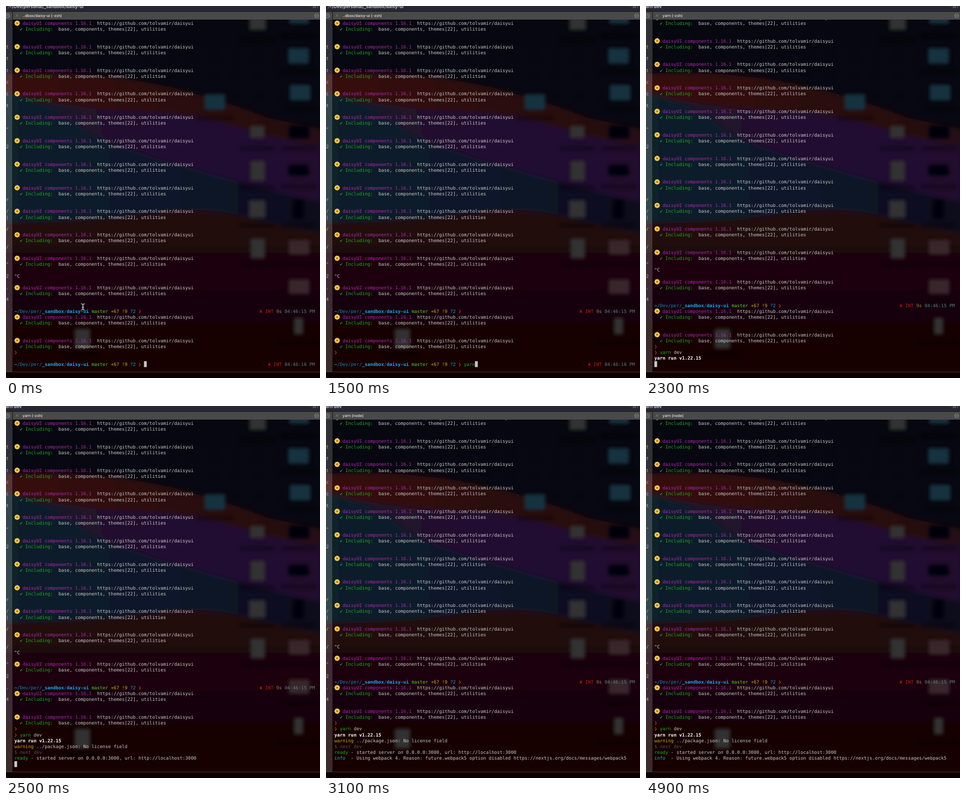
These frames come from a looping animation (600 by 709 pixels, 5000 ms). An HTML page:

```html
<!DOCTYPE html>
<html lang="en">
<head>
<meta charset="utf-8">
<title>Terminal</title>
<style>
html, body { margin: 0; width: 100%; height: 100%; overflow: hidden; background: #120306; }
svg { display: block; width: 600px; height: 709px; }
text { white-space: pre; text-rendering: geometricPrecision; }
.mono { font: 8.75px "DejaVu Sans Mono", "Liberation Mono", monospace; fill: #c7c7c7; }
.ui { font: 500 7.3px Inter, sans-serif; fill: #e6e6e6; }
.title { font: 700 8.4px Inter, sans-serif; fill: #c4c4cc; text-anchor: end; }
.magenta { fill: #b428b2; }
.green { fill: #1cad1c; }
.dir { fill: #1287b4; }
.anchor { fill: #14a9f0; font-weight: bold; }
.branch { fill: #55cf25; }
.yellow { fill: #cfab1c; }
.blue { fill: #1a9fe0; }
.arrow { fill: #d9391c; }
.red { fill: #cc1610; }
.olive { fill: #80805c; }
.time { fill: #577f80; }
.bold { fill: #fff; font-weight: bold; }
.dim { fill: #585054; }
.cyan { fill: #25b0bd; }
</style>
</head>
<body>
<svg viewBox="0 0 600 709">
  <defs>
    <filter id="soft" x="-10%" y="-10%" width="120%" height="120%"><feGaussianBlur stdDeviation="5"/></filter>
    <filter id="haze" x="-10%" y="-10%" width="120%" height="120%"><feGaussianBlur stdDeviation="3"/></filter>
    <linearGradient id="sky" x2="0" y2="1"><stop stop-color="#06070f"/><stop offset="1" stop-color="#0b0a18"/></linearGradient>
    <linearGradient id="crimson"><stop stop-color="#38100f"/><stop offset=".5" stop-color="#2c0b0e"/><stop offset="1" stop-color="#260912"/></linearGradient>
    <linearGradient id="violet"><stop stop-color="#1c1426"/><stop offset=".6" stop-color="#240f33"/><stop offset="1" stop-color="#1f0d2e"/></linearGradient>
    <linearGradient id="teal"><stop stop-color="#0d2129"/><stop offset=".5" stop-color="#10162a"/><stop offset="1" stop-color="#0c0c1c"/></linearGradient>
    <linearGradient id="floor" x2="0" y2="1"><stop stop-color="#25090c"/><stop offset=".35" stop-color="#1b0508"/><stop offset="1" stop-color="#100204"/></linearGradient>
    <clipPath id="pane"><path d="M0 26H600V697H0z"/></clipPath>
    <g id="daisy"></g>
  </defs>

  <rect width="600" height="709" fill="url(#sky)"/>
  <g filter="url(#soft)">
    <path fill="url(#crimson)" d="M-20 130Q130 122 250 142T500 213L620 238V420H-20z"/>
    <path fill="url(#violet)" d="M-20 160Q110 196 250 200T480 245L620 268V420H-20z"/>
    <path fill="url(#teal)" d="M-20 158Q90 186 130 222T330 303T620 378V460H-20z"/>
    <path fill="url(#floor)" d="M-20 412Q150 412 260 396T450 400T620 436V730H-20z"/>
  </g>
  <g id="icons" filter="url(#haze)"></g>

  <path fill="#fff" fill-opacity=".17" d="M0 26H12V698H0z"/>
  <path fill="#000" fill-opacity=".3" d="M0 698H600V709H0z"/>
  <path stroke="#54454a" stroke-opacity=".7" d="M0 697.5H600"/>
  <g id="side"></g>
  <g clip-path="url(#pane)"><g id="screen"></g></g>

  <path fill="#272734" d="M0 0H600V11H0z"/>
  <path fill="#494949" d="M0 11H600V26H0z"/>
  <path stroke="#15151b" d="M0 10.5H600M12.5 11V698"/>
  <text class="title" id="title" y="4"></text>
  <text class="title" x="597" y="4" style="font-weight:400;fill:#85858c">⌃⌘1</text>
  <text class="ui" id="tab" x="31.5" y="21"></text>
  <g fill="none" stroke="#aaa" stroke-width=".8">
    <path stroke="#858585" d="M18.8 15.8l5 5m0-5l-5 5"/>
    <circle cx="3" cy="18.5" r="3.7"/><path d="M1 18.5h4"/>
    <circle cx="593.5" cy="18.5" r="3.7"/><path d="M591.5 18.5h4"/>
  </g>
  <g id="beam" fill="none" stroke-linecap="round">
    <path id="beamShape" stroke="#222" stroke-width="2.6" d="M144 567.5Q147 567.5 147 570V577Q147 579.5 144 579.5M150 567.5Q147 567.5 147 570M147 577Q147 579.5 150 579.5M145.5 574H148.5"/>
    <use href="#beamShape"/>
    <path stroke="#e8e8e8" d="M144 567.5Q147 567.5 147 570V577Q147 579.5 144 579.5M150 567.5Q147 567.5 147 570M147 577Q147 579.5 150 579.5M145.5 574H148.5"/>
  </g>
</svg>
<script>
const LOOP = 5000, LEFT = 16, COL = 5.268, LINE = 11.2, BASE = 36, LAST = 58;
const START = 1200, KEY = 100, ENTER = 2000, READY = 2500, INFO = 2800;
const $ = id => document.getElementById(id);

function add(parent, tag, attrs, text = "") {
  const el = document.createElementNS("http://www.w3.org/2000/svg", tag);
  for (const k in attrs) el.setAttribute(k, attrs[k]);
  el.textContent = text;
  return parent.appendChild(el);
}

// A row is a list of [column, class, text] pieces.
function row(n, ...parts) {
  const text = add($("screen"), "text", { class: "mono", y: BASE + n * LINE });
  for (const [col, cls, str] of parts)
    add(text, "tspan", { x: LEFT + col * COL, class: cls }, str);
  return text;
}

function daisyRows(n) {
  add($("screen"), "use", { href: "#daisy", x: 21.3, y: BASE - 3.2 + n * LINE });
  row(n, [3, "magenta", "daisyUI components 1.16.1"], [30, "", "https://github.com/tolvamir/daisyui"]);
  row(n + 1, [2, "green", "✔"], [4, "green", "Including:"], [16, "", "base, components, themes[22], utilities"]);
}

function prompt(n, time, took) {
  const right = took ? 89 : 92;
  return row(n, [0, "anchor", "~"], [1, "dir", "/Dev/per/"], [10, "anchor", "_sandbox"], [18, "dir", "/"],
    [19, "anchor", "daisy-ui"], [28, "branch", "master"], [35, "yellow", "+67"], [39, "yellow", "!9"],
    [42, "blue", "?2"], [45, "arrow", "❯"], [right, "red", "✘"], [right + 2, "red", "INT"],
    [95, "olive", took], [98, "time", time]);
}

for (let i = 0; i < 8; i++) {
  const a = i * Math.PI / 4;
  add($("daisy"), "circle", { cx: 3.5 * Math.cos(a), cy: 3.5 * Math.sin(a), r: 1.8, fill: "#f6cf45" });
}
add($("daisy"), "circle", { r: 3, fill: "#f6cf45" });
add($("daisy"), "circle", { r: 1.9, fill: "#b9671c" });

const FOLDER = "#12333f", FILE = "#303033", BLACK = "#050407", WARM = "#37262a";
for (const [x, y, w, h, fill] of [
  [560, 26, 38, 16, FOLDER], [559, 95, 40, 30, FOLDER], [562, 165, 40, 30, FOLDER], [399, 183, 40, 30, FOLDER],
  [481, 34, 32, 24, FILE], [480, 240, 28, 24, FILE], [481, 314, 28, 38, FILE], [480, 387, 32, 34, FILE],
  [481, 462, 28, 38, FILE], [560, 240, 38, 24, BLACK], [559, 313, 38, 20, BLACK], [559, 387, 20, 36, BLACK],
  [560, 460, 40, 28, WARM], [560, 535, 40, 28, WARM], [559, 610, 18, 32, FILE], [146, 634, 30, 38, FILE]
]) {
  add($("icons"), "rect", { x: x - w / 2, y: y - h / 2, width: w, height: h, rx: 3, fill });
  add($("icons"), "rect", { x: x - 34, y: y + 26, width: 68, height: 10, fill: "#000", opacity: .3 });
}

[..."    t t t c c t   \"  2        r /| /  /  \" 2 . 4"].forEach((c, i) => {
  if (c !== " ") add($("side"), "text", { class: "mono", x: 0, y: BASE + i * LINE, opacity: .8 }, c);
});

for (let n = 0; n <= 40; n += 4) daisyRows(n);
row(43, [0, "", "^C"]);
daisyRows(45);
prompt(49, "04:46:15 PM", "9s");
daisyRows(50);
daisyRows(54);
row(56, [0, "arrow", "❯"]);

const live = prompt(58, "04:46:16 PM", "");
const typed = row(58, [47, "green", ""], [52, "", ""]);
const output = [
  [ENTER, [0, "arrow", "❯"], [2, "green", "yarn"], [7, "", "dev"]],
  [2300, [0, "bold", "yarn run v1.22.15"]],
  [2400, [0, "yellow", "warning"], [8, "", "../package.json: No license field"]],
  [2400, [0, "dim", "$ next dev"]],
  [READY, [0, "green", "ready"], [6, "", "- started server on 0.0.0.0:3000, url: http://localhost:3000"]],
  [INFO, [0, "cyan", "info"], [6, "", "- Using webpack 4. Reason: future.webpack5 option disabled https://nextjs.org/docs/messages/webpack5"]]
].map(([at, ...parts], i) => ({ at, el: row(57 + i, ...parts) }));
const cursor = add($("screen"), "rect", { width: COL, height: LINE, fill: "#c9c6c7" });

const show = (el, on) => el.setAttribute("visibility", on ? "visible" : "hidden");

function cursorOn(t) {
  if (t < START) return t % 1000 < 500;
  return t < 2750 || (t - 2750) % 1000 >= 500;
}

function draw(t) {
  const entered = t >= ENTER;
  const keys = Math.max(0, Math.min(8, Math.floor((t - START) / KEY) + 1));
  const printed = output.filter(o => t >= o.at).length;
  const line = entered ? 57 + printed : LAST;

  for (const o of output) show(o.el, t >= o.at);
  show(live, !entered);
  show(typed, !entered);
  show($("beam"), t < START);
  typed.children[0].textContent = "yarn".slice(0, keys);
  typed.children[1].textContent = "dev".slice(0, Math.max(0, keys - 5));

  cursor.setAttribute("x", LEFT + (entered ? 0 : 47 + keys) * COL);
  cursor.setAttribute("y", BASE - 8.6 + line * LINE);
  show(cursor, cursorOn(t));
  $("screen").setAttribute("transform", `translate(0 ${(LAST - line) * LINE})`);

  $("title").textContent = entered ? "yarn dev" : ":~/Dev/personal/_sandbox/daisy-ui";
  $("title").setAttribute("x", entered ? 30 : 148);
  $("tab").textContent = !entered ? "..dbox/daisy-ui (-zsh)" : t < INFO ? "yarn (-zsh)" : "yarn (node)";
}

const t0 = performance.now();
function tick() {
  draw((performance.now() - t0) % LOOP);
  requestAnimationFrame(tick);
}
tick();
</script>
</body>
</html>
```
